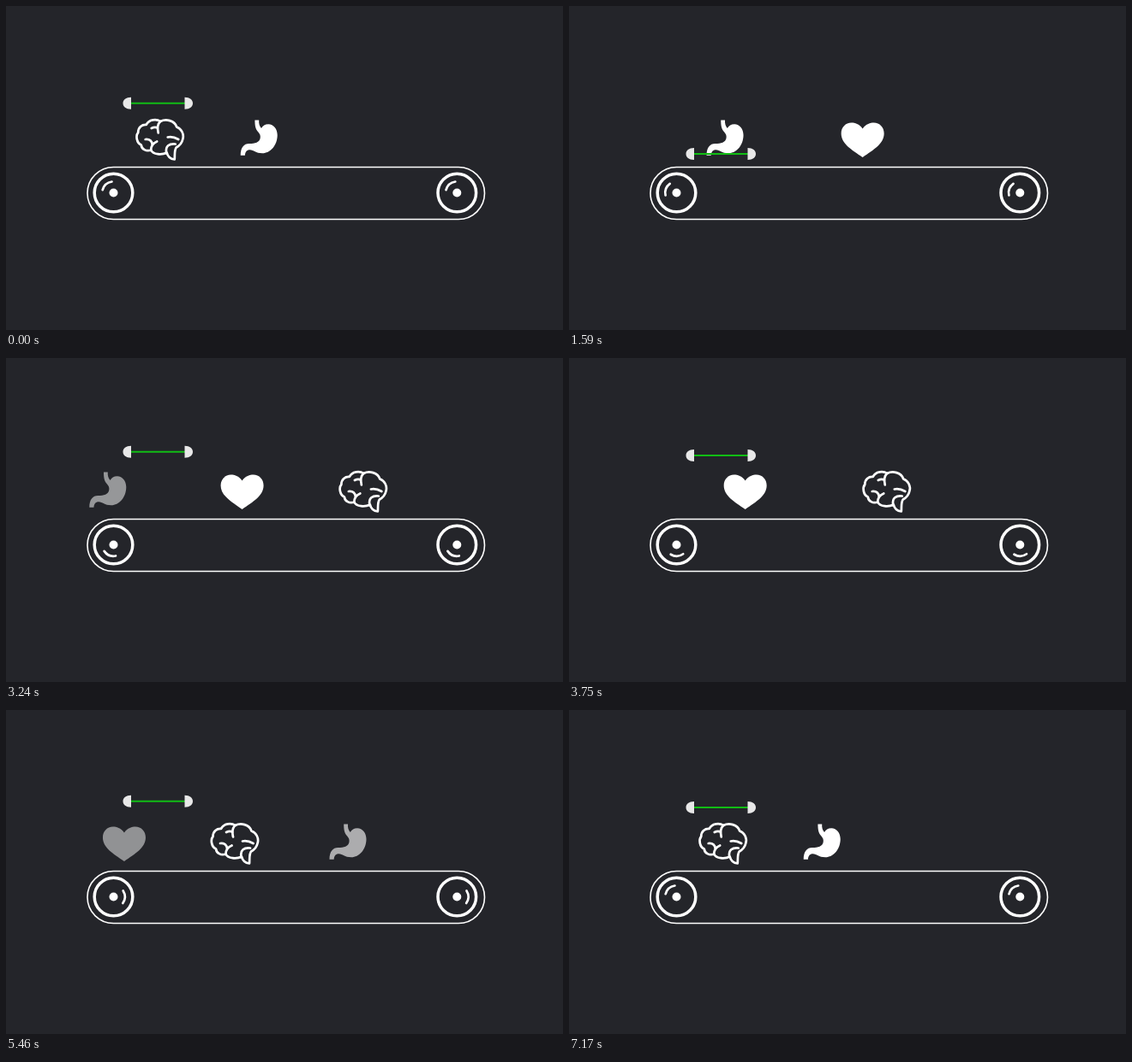
These frames come from a looping animation (650x379 px, 7200 ms). An HTML page:

```html
<!DOCTYPE html>
<html lang="en">
<head>
<meta charset="utf-8">
<title>Organ conveyor</title>
<style>
  html, body { margin: 0; width: 100%; height: 100%; overflow: hidden; background: #24252a; }
  svg { display: block; width: 650px; height: 379px; }
  .line { fill: none; stroke: #fff; stroke-linecap: round; stroke-linejoin: round; }
</style>
</head>
<body>
<svg viewBox="0 0 650 379">
  <defs>
    <g id="wheel">
      <circle class="line" r="22.3" stroke-width="3.5"/>
      <circle r="5" fill="#fff"/>
    </g>
    <path id="glint" class="line" stroke-width="2.7" d="M-12.8 -3.3A13.2 13.2 0 0 1 -2 -13"/>
  </defs>

  <rect class="line" x="95" y="188.5" width="463.5" height="61" rx="30.5" stroke-width="1.6"/>
  <g transform="translate(125.5 218.5)"><use href="#wheel"/><use href="#glint" class="spin"/></g>
  <g transform="translate(526.3 218.5)"><use href="#wheel"/><use href="#glint" class="spin"/></g>

  <g id="brain" class="line" stroke-width="2.7">
    <path d="M-16 139C-13 132.5 -4 132 .5 135C7 131.5 17 134 19.5 141.5C25 143.5 28.5 150 26.5 156C25.5 161 22.5 163.5 19 165.5C16.5 169 17.5 174 17 179.5C12 179 9 176 8 171.5C2 174.5 -8 174 -10.5 168.5C-16 170.5 -21.5 167.5 -22 162.5C-27.5 160 -28.5 151.5 -25.5 148C-25.5 142 -21 138.5 -16 139Z"/>
    <path d="M.5 135C-3 138 -3 144 -2 148.5M-2.5 143C-5 141 -8 142 -10 143M-17 156C-12 155.5 -9 158 -9 162.5M-10.5 168.5C-10.5 163 -7 160 -3.5 158.5M9 153.5C14 152.5 18 154 21.5 156M7.5 171.5C6 164 11 160.5 18 161.5"/>
  </g>
  <path id="stomach" fill="#fff" d="M-4.8 133.5H0C-.3 137.5 .5 140.5 2.8 143C4.5 140 7 138.3 11 138.3C17 138.3 21.5 144 21.5 151C21.5 163 13 172.3 4 172.3C-4 172.3 -6 168.3 -10.5 168.3C-14.5 168.3 -16 171 -16.3 174.7H-21.5C-21.5 165.5 -17.5 161 -11.5 161C-4.5 161 .5 159.5 1.5 154.5C2 151.5 1 149.5 -1 147.3C-4 144.3 -4.8 140 -4.8 133.5Z"/>
  <path id="heart" fill="#fff" d="M0 143.5C-4 138 -9 136.5 -13 136.5C-20 136.5 -25 142 -25 149C-25 161 -13 168 0 177C13 168 25 161 25 149C25 142 20 136.5 13 136.5C9 136.5 4 138 0 143.5Z"/>

  <g id="scanner">
    <path d="M146 0H209" stroke="#11bd14" stroke-width="2"/>
    <path fill="#e8e8e8" d="M146 -7V7C140 7 136.5 4 136.5 0S140 -7 146 -7ZM208.5 -7V7C214.5 7 218 4 218 0S214.5 -7 208.5 -7Z"/>
  </g>
</svg>
<script>
const LOOP = 7200;

// The belt advances three times per loop; "mid" is when half the way is done.
const moves = [
  { from: 0, mid: 600, to: 2000, spinMid: 520, turns: 2 },
  { from: 2260, mid: 3360, to: 4250, spinMid: 3450, turns: 2 },
  { from: 4400, mid: 5460, to: 7200, spinMid: 5510, turns: 3 }
];

// Each organ enters during move "first", waits, stops under the scanner, then leaves.
const organs = [
  { id: 'heart', first: 0, stops: [447, 338, 181, 95], fadeIn: 2.5, haste: 1 },
  { id: 'brain', first: 1, stops: [458, 354.5, 179.7, 87], fadeIn: 2.5, haste: 1.6 },
  { id: 'stomach', first: 2, stops: [503, 295.2, 177, 55], fadeIn: 1.24, haste: 1.2 }
];

const scans = [1680, 4440, 6600];  // moments of lowest scanner position

const clamp = v => Math.min(1, Math.max(0, v));
const mix = (a, b, p) => a + (b - a) * p;

// Quadratic speed-up until mid, quadratic slow-down after it.
function progress(t, { from, to }, mid) {
  return t < mid
    ? clamp((t - from) / (mid - from)) ** 2 / 2
    : 1 - clamp((to - t) / (to - mid)) ** 2 / 2;
}

function wheelAngle(t) {
  return moves.reduce((sum, m) => sum + 360 * m.turns * progress(t, m, m.spinMid), 0);
}

function organPose(t, { first, stops, fadeIn, haste }) {
  const now = moves.findLastIndex(m => t >= m.from);
  const leg = (now - first + 3) % 3;
  let p = progress(t, moves[now], moves[now].mid);
  if (leg === 2) p = clamp(p * haste);
  const alpha = [clamp(p * fadeIn), 1, 1 - p][leg];
  return { x: mix(stops[leg], stops[leg + 1], p), alpha };
}

// A gentle hover, twice per scan interval, plus a dive around each scan.
function scannerY(t) {
  const s = t < scans[0] ? t + LOOP : t;
  const i = scans.findLastIndex(b => s >= b);
  const next = scans[i + 1] ?? scans[0] + LOOP;
  const u = (s - scans[i]) / (next - scans[i]);
  const near = clamp(Math.min(u, 1 - u) / 0.25);
  const hover = 110.6 - 4 * Math.cos(4 * Math.PI * (u - 0.46));
  return hover + 70.5 * Math.cos(near * Math.PI / 2) ** 2;
}

const spins = document.querySelectorAll('.spin');
const scanner = document.getElementById('scanner');
for (const o of organs) o.el = document.getElementById(o.id);
const begin = performance.now();

function draw() {
  const t = Math.max(0, performance.now() - begin) % LOOP;
  for (const s of spins) s.setAttribute('transform', `rotate(${wheelAngle(t)})`);
  scanner.setAttribute('transform', `translate(0 ${scannerY(t)})`);
  for (const o of organs) {
    const { x, alpha } = organPose(t, o);
    o.el.setAttribute('transform', `translate(${x} 0)`);
    o.el.setAttribute('opacity', alpha);
  }
  requestAnimationFrame(draw);
}
draw();
</script>
</body>
</html>
```
